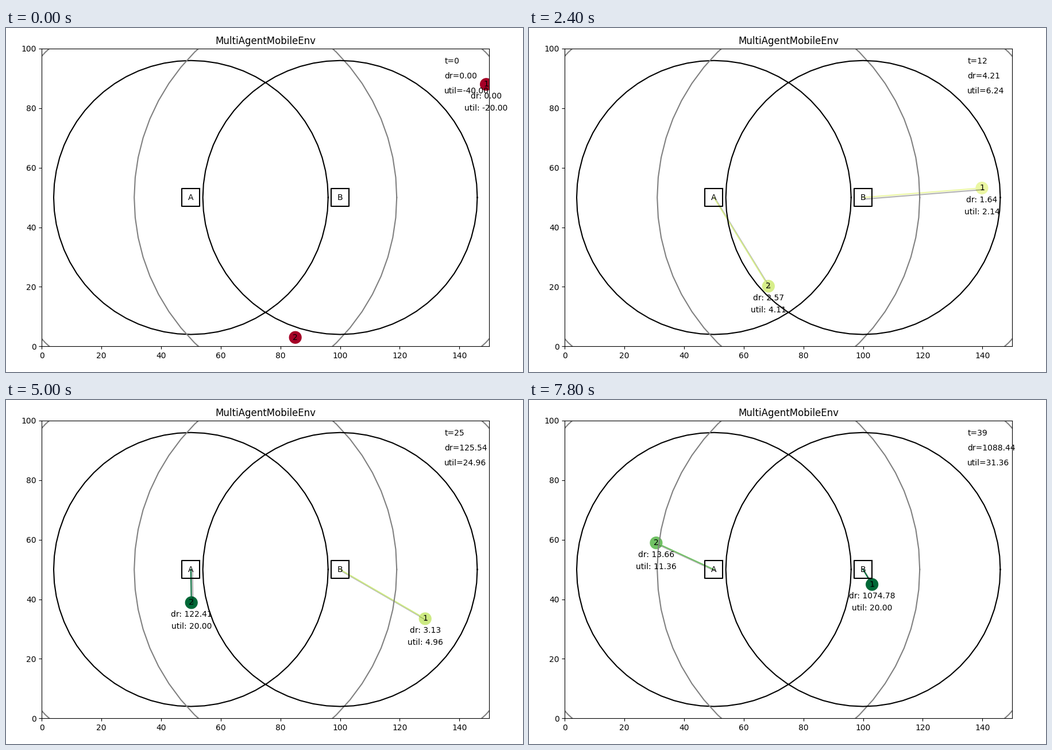
A matplotlib script that plays this animation: 900x600 px, repeating every 8000 ms.

```python
import numpy as np
import matplotlib.pyplot as plt
import matplotlib.patheffects as pe
from matplotlib.animation import FuncAnimation

W, H = 150, 100
STEPS, STEP_MS = 40, 200
STATIONS = {"A": np.array([50.0, 50.0]), "B": np.array([100.0, 50.0])}

# legs: start, heading, speed, first and last moving step
USERS = {
    1: [((149, 88), (134, 31), 3, 0), ((134, 31), (83, 54), 2, 22)],
    2: [((85, 3), (17, 73), 2, 0)],
}
# steps during which a user is attached to a station
LINKS = {1: {"B": (1, STEPS)}, 2: {"A": (2, STEPS), "B": (1, 7)}}

CMAP = plt.get_cmap("RdYlGn")
NORM = plt.Normalize(-20, 20)
SHADOW = [pe.SimpleLineShadow(shadow_color="black"), pe.Normal()]
CENTER = dict(ha="center", va="center")


def circle(center, radius):
    a = -np.linspace(0, 2 * np.pi, 65)
    return center[0] + radius * np.cos(a), center[1] + radius * np.sin(a)


def position(user, t):
    for start, end, speed, t0 in USERS[user]:
        if t >= t0:
            a, b = np.array(start, float), np.array(end, float)
            dist = np.hypot(*(b - a))
            pos = a + (b - a) * min(speed * (t - t0) / dist, 1)
    return pos


def data_rate(dist, freq=2500, height=50, ue_height=1.5, power=30):
    """Rate in Mbit/s with Okumura-Hata path loss."""
    lf, lh = np.log10(freq), np.log10(height)
    ch = 0.8 + (1.1 * lf - 0.7) * ue_height - 1.56 * lf
    loss = 69.55 + 26.16 * lf - 13.82 * lh - ch
    loss += (44.9 - 6.55 * lh) * np.log10(dist)
    snr = 10 ** ((power - loss) / 10) / 1e-9
    return 9e6 * np.log1p(snr) / np.log(2)


def utility(rate):
    return float(np.clip(10 * np.log10(rate), -20, 20)) if rate > 0 else -20.0


def color(util):
    return CMAP(NORM(util))


def linked(user, t):
    return [s for s, (a, b) in LINKS[user].items() if a <= t <= b]


def user_rates(user, t):
    pos = position(user, t)
    rates = {}
    for s in linked(user, t):
        sharing = sum(s in linked(u, t) for u in USERS)
        rates[s] = data_rate(np.hypot(*(STATIONS[s] - pos))) / sharing
    return rates


fig = plt.figure(figsize=(9, 6), dpi=100)
ax = fig.add_axes([62.2 / 900, 44.7 / 600, 779 / 900, 779 / 1.5 / 600])
ax.set_xlim(0, W)
ax.set_ylim(0, H)
ax.set_title("MultiAgentMobileEnv")

for name, (x, y) in STATIONS.items():
    ax.plot(x + np.array([3, 3, -3, -3, 3]), y + np.array([3, -3, -3, 3, 3]),
            color="black")
    ax.annotate(name, (x, y), **CENTER)
    ax.plot(*circle((x, y), 46), color="black")
    ax.plot(*circle((x, y), 69), color="gray")

info = [ax.text(0.9 * W, h * H, "") for h in (0.95, 0.9, 0.85)]
drawn = []


def draw_user(user, t):
    x, y = position(user, t)
    rates = user_rates(user, t)
    rate = sum(rates.values())
    util = utility(rate)
    drawn.extend(ax.fill(*circle((x, y), 2), color=color(util)))
    for s, r in rates.items():
        sx, sy = STATIONS[s]
        drawn.extend(ax.plot([x, sx], [y, sy], color=color(utility(r)),
                             path_effects=SHADOW, zorder=1.9))
    labels = [(0, str(user)), (4, f"dr: {rate:.2f}"), (8, f"util: {util:.2f}")]
    for drop, label in labels:
        drawn.append(ax.annotate(label, (x, y - drop), **CENTER))
    return rate, util


def draw(t):
    while drawn:
        drawn.pop().remove()
    rates, utils = zip(*(draw_user(u, t) for u in USERS))
    info[0].set_text(f"t={t}")
    info[1].set_text(f"dr={sum(rates):.2f}")
    info[2].set_text(f"util={sum(utils):.2f}")
    return info + drawn


anim = FuncAnimation(fig, draw, frames=STEPS, interval=STEP_MS,
                     init_func=lambda: draw(0), repeat=True, repeat_delay=0)
plt.show()
```
